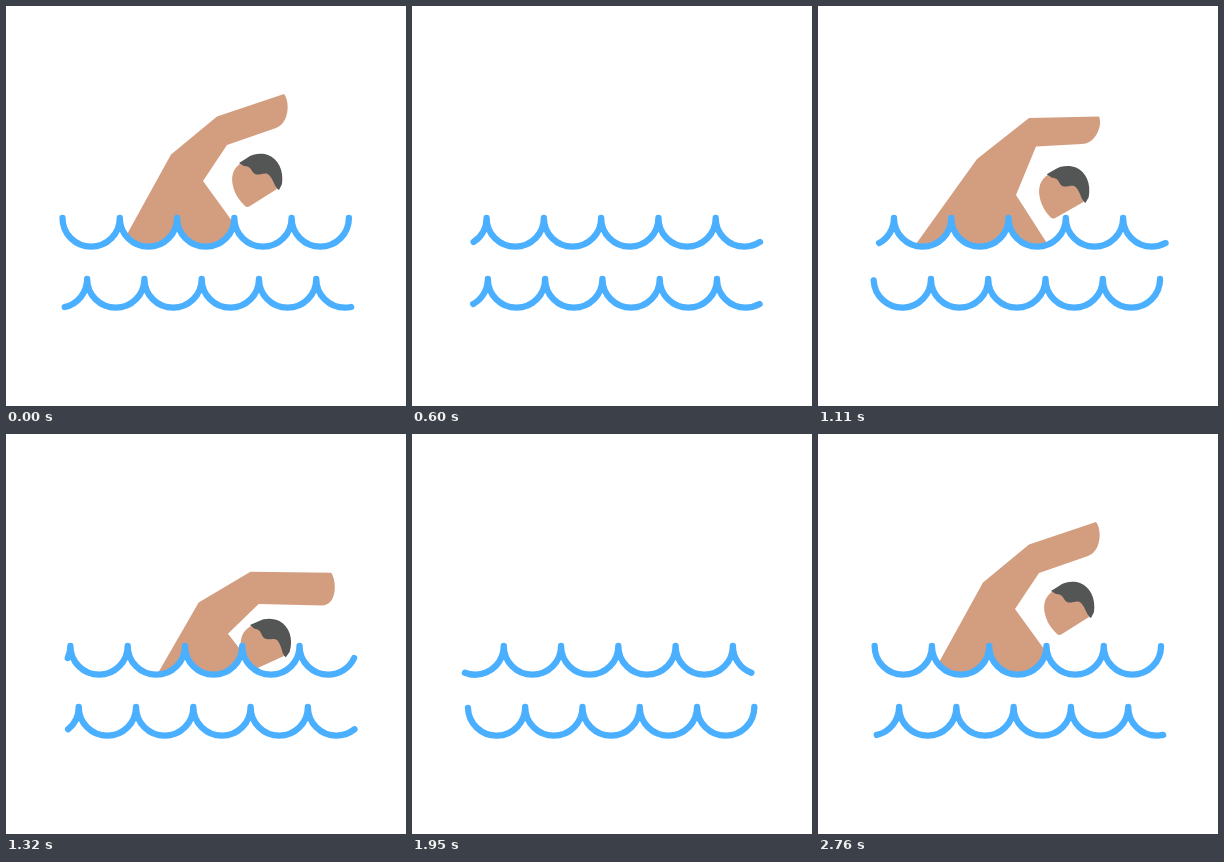
An HTML page with a canvas that plays this animation: 400x400 px, repeating every 2.79 s.

```html
<!DOCTYPE html>
<html lang="en">
<head>
<meta charset="utf-8">
<title>Swimmer</title>
<style>
  html, body { margin: 0; width: 100%; height: 100%; overflow: hidden; background: #fff; }
  canvas { display: block; width: 100vw; height: 100vh; }
</style>
</head>
<body>
<canvas id="stage" width="400" height="400"></canvas>
<script>
const ctx = document.getElementById('stage').getContext('2d');
const LOOP = 2790, STEP = 30;
const SKIN = '#d39e80', HAIR = '#545655', BLUE = '#4bafff';
const LEFT = 56.5, PERIOD = 57.28, RADIUS = PERIOD / 2, ARCS = 5;
const TOP_Y = 212, LOW_Y = 273;

// Points: back, shoulder, elbow, hand top, hand bottom, inner elbow, armpit, chest, head.
const up    = [98,270, 165,148.5, 211,110.5, 278,88, 270,122, 221,139, 197,175, 266,270, 250,172];
const mid   = [75,270, 159,153, 211,112, 281,110.5, 264,138, 218,140.5, 198,189, 250,270, 245,184];
const low   = [46,270, 133,191.5, 191,164, 273,182, 250,206, 197,194, 180,224, 205,270, 226.5,220.5];
const reach = [140,290, 205,190, 262,165, 350,182, 338,214, 268,200, 235,225, 290,290, 262,242];

const moved = (shape, dx, dy) => shape.map((v, i) => v + (i % 2 ? dy : dx));

const fall = t => [
  [t, up], [t + 165, reach], [t + 310, moved(reach, -25, 56)], [t + 420, moved(reach, -33, 76)]
];
const rise = (from, to) => [
  [from, moved(low, -25, 78)], [from + .27 * (to - from), low], [from + .656 * (to - from), mid], [to, up]
];
const body = [...fall(0), ...rise(900, 1220), ...fall(1220).slice(1), ...rise(2150, 2750), [LOOP, up]];

// Leftward travel of the upper and lower wave, in periods.
const waves = [
  [0, [0, .57]], [360, [.42, 0]], [840, [1, -.655]], [1110, [1.66, -.985]],
  [1530, [2.02, -1.56]], [2310, [2.677, -2.255]], [LOOP, [3, -2.43]]
];

// Smooth interpolation through the keys, without overshoot.
function sample(keys, t, firstSlope) {
  const last = keys.length - 1;
  let i = 0;
  while (i < last - 1 && t >= keys[i + 1][0]) i++;
  const span = keys[i + 1][0] - keys[i][0];
  const u = (t - keys[i][0]) / span, v = 1 - u;
  return keys[i][1].map((a, c) => {
    const secant = k => (keys[k + 1][1][c] - keys[k][1][c]) / (keys[k + 1][0] - keys[k][0]);
    const slope = k => {
      if (k === last) return 0;
      if (k === 0) return firstSlope * secant(0);
      const p = secant(k - 1), q = secant(k);
      return p * q <= 0 ? 0 : 2 * p * q / (p + q);
    };
    return a * v * v * (1 + 2 * u) + keys[i + 1][1][c] * u * u * (3 - 2 * u)
      + span * u * v * (slope(i) * v - slope(i + 1) * u);
  });
}

const fraction = p => p - Math.floor(p);

function arc(k, phase, y, from, to) {
  const x = LEFT + (k + .5 - phase) * PERIOD;
  ctx.arc(x, y, RADIUS, Math.PI * (1 - from), Math.PI * (1 - to), true);
}

function drawWave(travel, y) {
  const phase = fraction(travel);
  ctx.beginPath();
  for (let k = 0; k <= ARCS; k++) arc(k, phase, y, k ? 0 : phase, k < ARCS ? 1 : phase);
  ctx.stroke();
}

function clipAbove(travel, y) {
  const phase = fraction(travel);
  ctx.beginPath();
  ctx.moveTo(-60, 0);
  for (let k = -1; k <= ARCS + 1; k++) arc(k, phase, y, 0, 1);
  ctx.lineTo(460, 0);
  ctx.clip();
}

// Both head paths are drawn around the head's centre.
const face = new Path2D('M-15-15C-24-9-25 0-23 8C-21 17-16 23-11 28Q-9 30-6 28L21 11L12-10L-5-15Z');
const hair = new Path2D('M-17-15L-9-20C-3-25 7-25 12-23C22-19 28-8 26 6L23 12C18 9 18 2 13-3C9-7 4-2-1-4C-5-6-4-12-12-12Z');

function drawHead(x, y) {
  ctx.save();
  ctx.translate(x, y);
  ctx.rotate((y - up[17]) * .0038);
  ctx.fillStyle = SKIN;
  ctx.fill(face);
  ctx.fillStyle = HAIR;
  ctx.fill(hair);
  ctx.restore();
}

function drawBody(p) {
  const [cx, cy, dx, dy, ex, ey] = p.slice(4, 10);
  const len = Math.hypot(dx - cx, dy - cy);
  const ux = (dx - cx) / len, uy = (dy - cy) / len;
  const hx = ex - dx, hy = ey - dy;
  ctx.beginPath();
  for (let i = 0; i < 8; i += 2) ctx.lineTo(p[i], p[i + 1]);
  ctx.bezierCurveTo(dx + .3 * hx + 9 * ux, dy + .3 * hy + 9 * uy, ex + 14 * ux, ey + 14 * uy, ex, ey);
  for (let i = 10; i < 16; i += 2) ctx.lineTo(p[i], p[i + 1]);
  ctx.closePath();
  ctx.fillStyle = SKIN;
  ctx.fill();
}

function draw(t) {
  const [top, bottom] = sample(waves, t, 1);
  const pose = sample(body, t, 0);
  ctx.fillStyle = '#fff';
  ctx.fillRect(0, 0, 400, 400);
  ctx.save();
  clipAbove(top, TOP_Y);
  drawHead(pose[16], pose[17]);
  drawBody(pose);
  ctx.restore();
  ctx.strokeStyle = BLUE;
  ctx.lineWidth = 6.3;
  ctx.lineCap = ctx.lineJoin = 'round';
  drawWave(top, TOP_Y);
  drawWave(bottom, LOW_Y);
}

const start = performance.now();
function frame() {
  const t = (performance.now() - start) % LOOP;
  draw(Math.floor(t / STEP) * STEP);
  requestAnimationFrame(frame);
}
frame();
</script>
</body>
</html>
```
